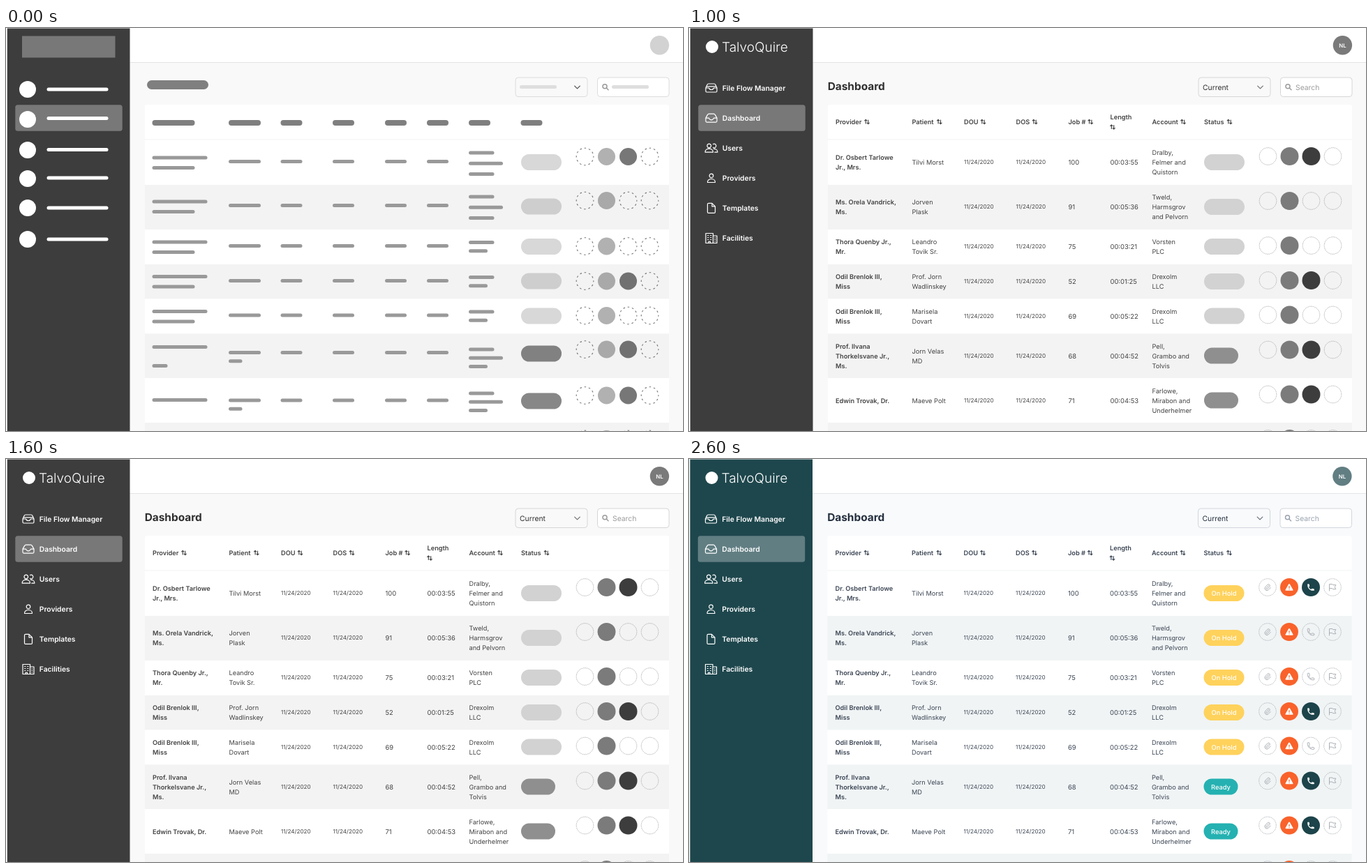
Recreate the animation shown at these times as an HTML page. Size 970 by 578 pixels, loop 3000 ms.

```html
<!DOCTYPE html>
<html lang="en">
<head>
<meta charset="utf-8">
<title>Dashboard, from wireframe to design</title>
<style>
  html, body { margin: 0; width: 100%; height: 100%; overflow: hidden; background: #fff; }
  svg { display: block; width: 970px; height: 578px; font-family: Inter, sans-serif; text-rendering: geometricPrecision; }
  .stage { visibility: hidden; animation: show 3s step-end infinite; }
  .s1 { animation-delay: -2s; }
  .s2 { animation-delay: -1s; }
  @keyframes show {
    0% { visibility: visible; }
    33.3333%, 100% { visibility: hidden; }
  }
</style>
</head>
<body>
<svg id="view" viewBox="0 0 970 578"></svg>
<script>
const themes = [
  { side: '#3d3d3d', active: '#787878', page: '#f9f9f9', alt: '#f3f3f3', line: '#e4e4e4', box: '#dcdcdc',
    avatar: '#d2d2d2', hold: '#d8d8d8', ready: '#878787', alert: '#b1b1b1', call: '#777', dash: '#777', hint: '#999', chevron: '#555' },
  { side: '#3d3d3d', active: '#787878', page: '#f9f9f9', alt: '#f3f3f3', line: '#e4e4e4', box: '#d6d6d6',
    avatar: '#7a7a7a', hold: '#d2d2d2', ready: '#8f8f8f', alert: '#7b7b7b', call: '#3d3d3d', dash: '#a2a2a2', hint: '#9c9c9c',
    chevron: '#777', title: '#2f2f2f', text: '#434343' },
  { side: '#1e474d', active: '#617e83', page: '#f8fafb', alt: '#f0f4f5', line: '#e3e7ea', box: '#d2d6dc',
    avatar: '#617e83', hold: '#ffd25c', ready: '#25b1b1', alert: '#f9622b', call: '#1c444a', dash: '#a3a8ad', hint: '#9aa3af',
    chevron: '#6b7280', title: '#252f3f', text: '#3b4554' }
];

const nav = ['File Flow Manager', 'Dashboard', 'Users', 'Providers', 'Templates', 'Facilities'];
const navDots = [88, 131, 175, 216, 258, 303];
const navBars = [88, 129.5, 174.5, 215, 258, 303];

// label, x, width of its placeholder, x of the sort arrows
const heads = [
  ['Provider', 210, 61, 255], ['Patient', 319.5, 46, 358.8], ['DOU', 394, 31, 421.5], ['DOS', 468.5, 31, 495.5],
  ['Job #', 543.5, 31, 575.2], ['Length', 603.5, 31, 607], ['Account', 663.5, 31, 708], ['Status', 738, 31, 774.5]
];

// top: row edge, mid: text centre, p/m/a: placeholder lines, badge/dots: wireframe centres
const rows = [
  { top: 160, mid: 193, p: 186, m: 191.5, a: 179, badge: 192.5, dots: 184.5, dotY: 184, call: 1, job: 100, len: '00:03:55',
    who: 'Dr. Osbert Tarlowe|Jr., Mrs.', patient: 'Tilvi Morst', account: 'Dralby,|Felmer and|Quistorn' },
  { top: 225, mid: 257, p: 249, m: 254.5, a: 242, badge: 256, dots: 247.5, dotY: 248, job: 91, len: '00:05:36',
    who: 'Ms. Orela Vandrick,|Ms.', patient: 'Jorven|Plask', account: 'Tweld,|Harmsgrov|and Pelvorn' },
  { top: 289, mid: 314, p: 307, m: 312.5, a: 307.5, badge: 313.5, dots: 313, dotY: 312, job: 75, len: '00:03:21',
    who: 'Thora Quenby Jr.,|Mr.', patient: 'Leandro|Tovik Sr.', account: 'Vorsten|PLC' },
  { top: 339, mid: 364, p: 356.5, m: 362.5, a: 357.5, badge: 363, dots: 363, dotY: 362, call: 1, job: 52, len: '00:01:25',
    who: 'Odil Brenlok III,|Miss', patient: 'Prof. Jorn|Wadlinskey', account: 'Drexolm|LLC' },
  { top: 388.5, mid: 413.5, p: 406.5, m: 412, a: 407, badge: 413, dots: 412.5, dotY: 411.5, job: 69, len: '00:05:22',
    who: 'Odil Brenlok III,|Miss', patient: 'Marisela|Dovart', account: 'Drexolm|LLC' },
  { top: 438.5, mid: 470.5, p: 457.5, m: 465.5, a: 461, badge: 467, dots: 461, dotY: 461.5, call: 1, ready: 1, job: 68, len: '00:04:52',
    who: 'Prof. Ilvana|Thorkelsvane Jr.,|Ms.', patient: 'Jorn Velas|MD', account: 'Pell,|Grambo and|Tolvis' },
  { top: 502, mid: 534.5, p: 533.5, m: 534, a: 524, badge: 535, dots: 527, dotY: 525.5, call: 1, ready: 1, job: 71, len: '00:04:53',
    who: 'Edwin Trovak, Dr.', patient: 'Maeve Polt', account: 'Farlowe,|Mirabon and|Underhelmer' },
  { top: 566, dots: 589.5, dotY: 589 }
];

const rect = (x, y, w, h, fill, r = 0, more = '') =>
  `<rect x="${x}" y="${y}" width="${w}" height="${h}" rx="${r}" fill="${fill}" ${more}/>`;
const dot = (x, y, r, fill, more = '') => `<circle cx="${x}" cy="${y}" r="${r}" fill="${fill}" ${more}/>`;
const bar = (x, y, w, h, fill) => rect(x, y - h / 2, w, h, fill, h / 2);
const stroke = (x, y, d, color, width = 1.1, scale = 1) =>
  `<path transform="translate(${x} ${y}) scale(${scale})" d="${d}" fill="none" stroke="${color}" stroke-width="${width / scale}" stroke-linecap="round" stroke-linejoin="round"/>`;
const solid = (x, y, d, fill, scale = 1) => `<path transform="translate(${x} ${y}) scale(${scale})" d="${d}" fill="${fill}"/>`;

// y is the middle of the capitals
const text = (x, y, s, size, fill, weight = 400, anchor = 'start') =>
  `<text x="${x}" y="${y + size * .364}" font-size="${size}" font-weight="${weight}" fill="${fill}" text-anchor="${anchor}">${s}</text>`;
const lines = (x, y, s, fill, weight) => {
  const parts = s.split('|');
  return parts.map((p, i) => text(x, y + (i - (parts.length - 1) / 2) * 14, p, 9.2, fill, weight)).join('');
};

const icon = {
  stack: 'M-8 0l2-4.5q.6-1.5 2-1.5h8q1.4 0 2 1.5L8 0v4.5q0 1.5-1.5 1.5h-13q-1.5 0-1.5-1.5zM-8 0h4.5q1 2.5 3.5 2.5T3.5 0H8M-6.5-2.2h13',
  inbox: 'M-8 0l2.6-4.7q.6-1.3 2-1.3h6.8q1.4 0 2 1.3L8 0v4.5q0 1.5-1.5 1.5h-13q-1.5 0-1.5-1.5zM-8 0h4.5q1 2.7 3.5 2.7T3.5 0H8',
  users: 'M-6-3.2a2.8 2.8 0 1 0 5.6 0a2.8 2.8 0 1 0-5.6 0M-8.8 6v-1a5.6 4 0 0 1 11.2 0v1zM2.6-5.6a2.8 2.8 0 1 1 0 4.8M4.8 6h4v-1a5 4 0 0 0-5.2-3.8',
  user: 'M-2.8-3.4a2.8 2.8 0 1 0 5.6 0a2.8 2.8 0 1 0-5.6 0M-5.4 6.2v-1a5.4 4 0 0 1 10.8 0v1z',
  doc: 'M-5.5-5.5q0-1.5 1.5-1.5h5l4.5 4.5v8q0 1.5-1.5 1.5h-8q-1.5 0-1.5-1.5zM1-7v4.5h4.5',
  office: 'M-8 7V-7H2.5V7zM2.5-3.5H8V7H2.5M-5.2-4h1M-1.2-4h1M-5.2-1h1M-1.2-1h1M-5.2 2h1M-1.2 2h1M-4 7V4.8h2.5V7M5-.5h.6M5 2h.6M5 4.5h.6',
  sort: 'M-1.7-3.2V2.4M-3.3-1.6L-1.7-3.2L-.2-1.6M1.7-2.4V3.2M.2 1.6L1.7 3.2L3.3 1.6',
  phone: 'M-8-7a1 1 0 0 1 1-1h2.2a1 1 0 0 1 1 .8l.7 4.5a1 1 0 0 1-.5 1l-1.6.8a11 11 0 0 0 6.1 6.1l.8-1.6a1 1 0 0 1 1-.5l4.4.7a1 1 0 0 1 .9 1V7a1 1 0 0 1-1 1H5C-2.2 8-8 2.2-8-5z',
  clip: 'M3.2-5l-6.6 6.6a2 2 0 1 0 2.8 2.8l6.4-6.6a4 4 0 0 0-5.6-5.6l-6.4 6.6a6 6 0 1 0 8.5 8.5L8.5 1',
  flag: 'M-4.5 5V-4.5h4.3l.7 1.1h4.3L3.2-.3l1.6 3H.4l-.7-1.1h-4.2',
  alert: 'M-.9-4.4q.9-1.4 1.8 0l4.5 7.8q.6 1.4-.9 1.4h-9q-1.5 0-.9-1.4z'
};
const navIcons = ['stack', 'inbox', 'users', 'user', 'doc', 'office'];

function sidebar(t, wire) {
  let s = rect(1.5, .5, 176, 578, t.side) + rect(13.3, 110.3, 153.4, 37.5, t.active, 3.5);
  if (wire) {
    s += rect(23, 11.5, 133.5, 31, t.active);
    return s + navDots.map((y, i) => dot(31, y, 12, '#fff') + bar(58.5, navBars[i], 88, 5, '#fff')).join('');
  }
  s += dot(33, 27, 9, '#fff') + text(47, 27, 'TalvoQuire', 19, '#fff', 300);
  return s + nav.map((label, i) => {
    const y = 86 + i * 43.1;
    return stroke(32, y, icon[navIcons[i]], '#fff', 1.2) + text(47.8, y, label, 10.3, '#fff', 600);
  }).join('');
}

function toolbar(t, wire) {
  let s = rect(177.5, 0, 793, 49.5, '#fff') + rect(177.5, 49, 793, 1, t.line) + dot(936.4, 24.7, 13.7, t.avatar);
  s += rect(730, 71, 103, 27.5, t.page, 4, `stroke="${t.box}"`) + rect(847.5, 71, 102.5, 27.5, '#fff', 4, `stroke="${t.box}"`);
  s += stroke(818.5, 85, 'M-3.8-1.9L0 1.9L3.8-1.9', t.chevron, 1.3);
  s += stroke(859, 84.5, 'M-4-.8a3 3 0 1 0 6 0a3 3 0 1 0-6 0M1.3 1.5L4 4.2', t.hint, 1.5);
  if (wire) {
    return s + bar(202, 81.5, 88, 13, '#7f7f7f') + bar(736, 84.5, 53, 5, '#dedede') + bar(868, 84.5, 53, 5, '#dedede');
  }
  return s + text(936.4, 24.7, 'NL', 7.8, '#fff', 600, 'middle') + text(198.7, 83.2, 'Dashboard', 15.4, t.title, 650) +
    text(736, 85, 'Current', 10.35, t.title) + text(869, 85, 'Search', 10.35, t.hint);
}

function header(t, wire) {
  return rect(199, 110, 751, 50, '#fff', 3) + heads.map(([label, x, w, sortX]) => {
    if (wire) return bar(x - .5, 136, w, 8, '#7f7f7f');
    const two = label === 'Length';
    return text(x, two ? 128 : 134.5, label, 9.2, t.text, 600) + stroke(sortX, two ? 142 : 134.5, icon.sort, t.text, 1.15);
  }).join('');
}

function actions(r, t, k) {
  const y = k ? r.dotY : r.dots;
  const on = [0, t.alert, r.call && t.call, 0];
  return on.map((fill, i) => {
    const x = 829.5 + i * 31;
    let s = fill ? dot(x, y, k ? 13 : 12.5, fill)
      : dot(x, y, 12.3, 'none', `stroke="${t.dash}" ${k ? 'stroke-dasharray="1.2 1.2"' : 'stroke-width="1.1" stroke-dasharray="2.6 3.84" stroke-dashoffset="1.3"'}`);
    if (k < 2) return s;
    if (i === 0) s += stroke(x, y, icon.clip, t.dash, .9, .5);
    if (i === 1) s += solid(x, y, icon.alert, '#fff') + stroke(x, y, 'M0-1.4V1M0 2.9V3', t.alert, 1.2);
    if (i === 2) s += fill ? solid(x, y, icon.phone, '#fff', .6) : stroke(x, y, icon.phone, t.dash, .9, .6);
    if (i === 3) s += stroke(x, y, icon.flag, t.dash, .9);
    return s;
  }).join('');
}

function wireCells(r, i) {
  const grey = '#999';
  const many = (x, y, step, widths) => widths.map((w, n) => bar(x, y + n * step, w, 5, grey)).join('');
  const who = i < 5 ? [79, 61] : i < 6 ? [79, 22] : [79];
  const account = i < 2 ? [36.5, 49, 36.5] : i < 5 ? [36.5, 27] : [36.5, 49, 27];
  return many(209.5, r.p, i < 5 ? 14.5 : 27, who) + many(319, r.m, 12.2, r.ready ? [46, 19.5] : [46]) +
    heads.slice(2, 6).map(h => bar(h[1] - .5, r.m, 31, 5, grey)).join('') +
    many(663, r.a, i < 2 ? 15.2 : 12.3, account);
}

function cells(r, t) {
  const c = t.text;
  return lines(210, r.mid, r.who, c, 600) + lines(319.5, r.mid, r.patient, c) +
    [394, 468.5].map(x => text(x, r.mid - .5, '11/24/2020', 8.1, c)).join('') +
    text(543.5, r.mid, r.job, 9.4, c) + text(603.5, r.mid, r.len, 9.4, c) + lines(663.5, r.mid, r.account, c);
}

function row(r, i, t, k) {
  const next = rows[i + 1];
  let s = rect(199, r.top, 751, (next ? next.top : 578) - r.top, i % 2 ? t.alt : '#fff');
  let marks = actions(r, t, k);
  if (next) {
    const w = k && r.ready ? 49 : 58;
    const y = k ? r.mid - .5 : r.badge;
    marks += bar(738, y, w, 23, r.ready ? t.ready : t.hold);
    if (k === 2) marks += text(738 + w / 2, y + .5, r.ready ? 'Ready' : 'On Hold', 9.3, '#fff', 500, 'middle');
    s += k ? cells(r, t) : wireCells(r, i);
  }
  // wireframe marks let the striped rows shine through
  return s + (k ? marks : `<g style="mix-blend-mode:multiply">${marks}</g>`);
}

document.getElementById('view').innerHTML = themes.map((t, k) => {
  const wire = k === 0;
  const shift = k === 2 ? 'transform="translate(-.5 0)"' : '';
  return `<g class="stage s${k}">` + rect(177, 49, 793, 529, t.page) + `<g ${shift}>` +
    toolbar(t, wire) + header(t, wire) + rows.map((r, i) => row(r, i, t, k)).join('') +
    rect(199, 159.5, 751, 1, t.alt) + sidebar(t, wire) + '</g>' +
    rect(0, 0, 1.5, 578, '#fff') + '</g>';
}).join('');
</script>
</body>
</html>
```
